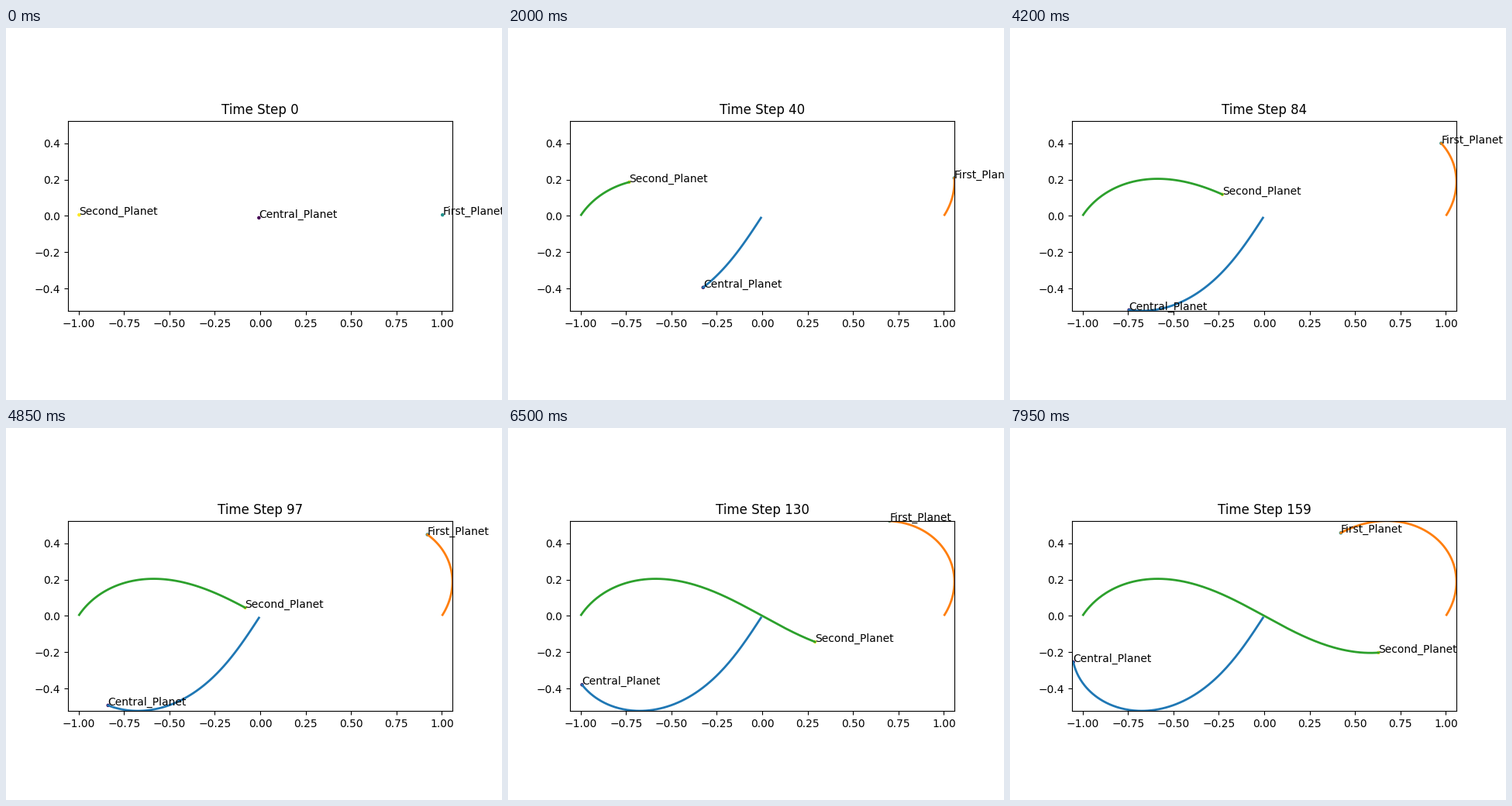
These frames come from a looping animation (640x480 px, 8000 ms). A matplotlib script:

```python
import numpy as np
import matplotlib.pyplot as plt
from matplotlib.animation import FuncAnimation

DT = 0.01
FRAMES = 160
PERIOD = 633  # steps in one full figure-eight orbit
NAMES = ["Central_Planet", "First_Planet", "Second_Planet"]


def accel(pos):
    diff = pos[None, :, :] - pos[:, None, :]
    dist = np.linalg.norm(diff, axis=2) + np.eye(3)
    return (diff / dist[:, :, None] ** 3).sum(axis=1)


def deriv(state):
    return np.array([state[1], accel(state[0])])


def rk4(state, h):
    k1 = deriv(state)
    k2 = deriv(state + h / 2 * k1)
    k3 = deriv(state + h / 2 * k2)
    k4 = deriv(state + h * k3)
    return state + h / 6 * (k1 + 2 * k2 + 2 * k3 + k4)


def simulate(steps):
    vel = np.array([0.347111, 0.532728])
    state = np.array([[[0, 0], [1, 0], [-1, 0]], [-2 * vel, vel, vel]], dtype=float)
    path = []
    for _ in range(steps):
        state = rk4(state, DT)
        path.append(state[0])
    return np.array(path)


path = simulate(PERIOD)
low, high = path.min(axis=(0, 1)), path.max(axis=(0, 1))

fig, ax = plt.subplots(figsize=(6.4, 4.8), dpi=100)
ax.set_aspect("equal")
ax.set_xlim(low[0], high[0])
ax.set_ylim(low[1], high[1])
ax.set_xticks(np.arange(-4, 5) * 0.25)
ax.set_yticks(np.arange(-2, 3) * 0.2)

title = ax.set_title("Time Step 0")
dots = ax.scatter(*path[0].T, c=[0, 1, 2], s=5)
trails = [ax.plot([], [], lw=2)[0] for _ in NAMES]
labels = [ax.text(0, 0, name) for name in NAMES]


def update(step):
    title.set_text(f"Time Step {step}")
    dots.set_offsets(path[step])
    for i, (trail, label) in enumerate(zip(trails, labels)):
        trail.set_data(*path[:step + 1, i].T)
        label.set_position(path[step, i])
    return [title, dots, *trails, *labels]


anim = FuncAnimation(fig, update, frames=FRAMES, interval=50, repeat=True, repeat_delay=0)
plt.show()
```
